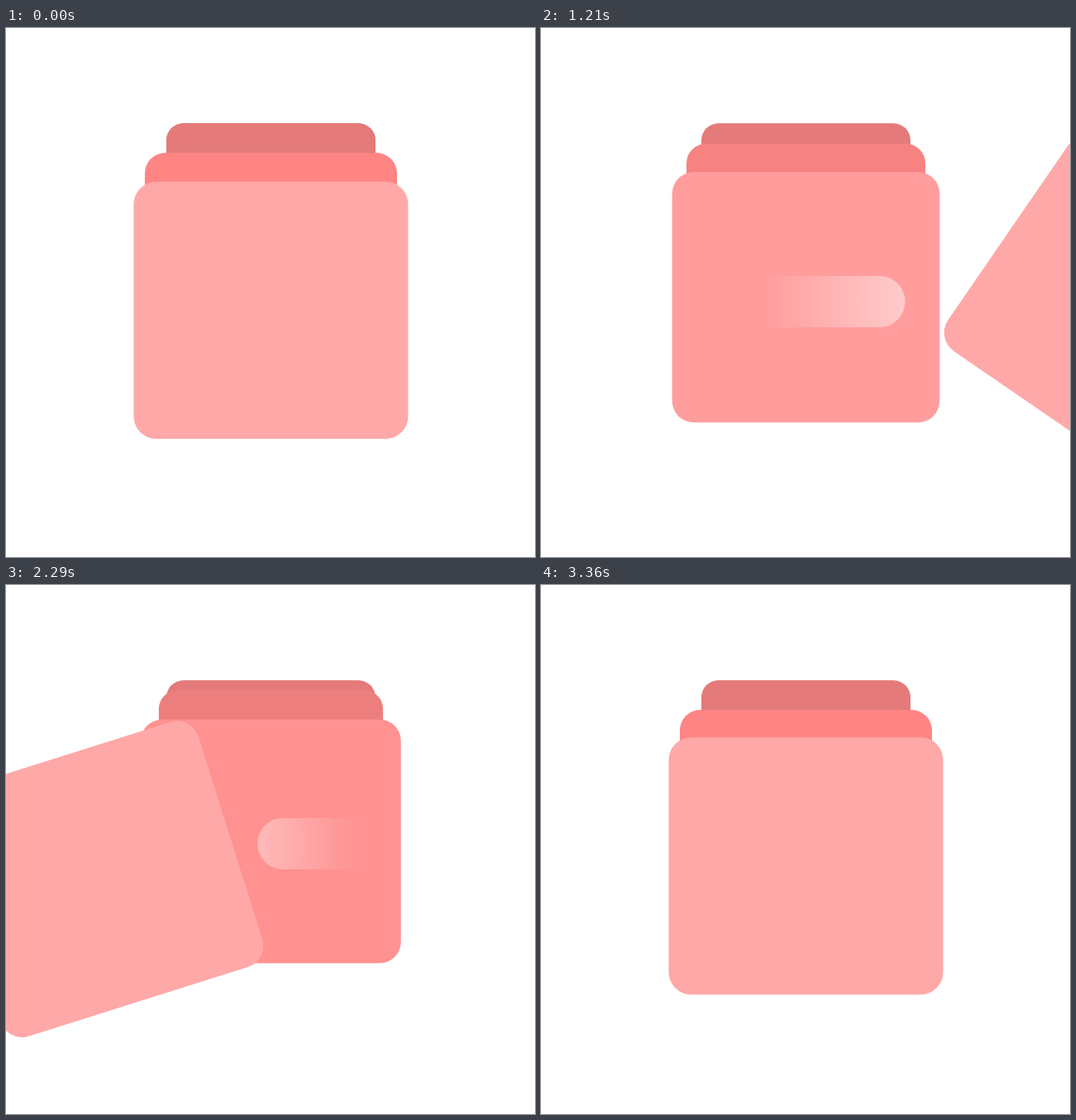
An HTML page with a canvas for the animation above (3430 ms loop, 640 by 640 pixels).

```html
<!DOCTYPE html>
<html lang="en">
<head>
<meta charset="utf-8">
<title>Card stack swipe</title>
<style>
  html, body { margin: 0; width: 100%; height: 100%; overflow: hidden; background: #fff; }
  canvas { display: block; }
</style>
</head>
<body>
<canvas width="640" height="640"></canvas>
<script>
const ctx = document.querySelector('canvas').getContext('2d');
const LOOP = 3430, SWITCH = 1727, CX = 320.5;

// Stack levels from back to front
const levels = [
  { y: 233.8, scale: 0.762, rgb: [228, 122, 122] },
  { y: 294, scale: 0.919, rgb: [255, 133, 133] },
  { y: 340, scale: 1, rgb: [255, 168, 168] }
];

const swipes = [
  { start: 60, time: 1710, ease: 0.12, y: 341.5, dx: 553, dy: 0, turn: 50 },
  { start: SWITCH, time: 1610, ease: 0, y: 340, dx: -592, dy: 45, turn: -50 }
];

// Hints showing the drag direction
const hints = [
  { show: 35, start: 0, center: 202, y: 300, dir: 1 },
  { show: 1675, start: 1710, center: 439, y: 282, dir: -1 }
];

const clamp = v => Math.min(1, Math.max(0, v));
const mix = (a, b, p) => a + (b - a) * p;
const white = a => `rgba(255,255,255,${a})`;

function card(x, y, scale, rgb, angle = 0) {
  ctx.save();
  ctx.translate(x, y);
  ctx.rotate(angle * Math.PI / 180);
  ctx.scale(scale, scale);
  ctx.fillStyle = `rgb(${rgb})`;
  ctx.beginPath();
  ctx.roundRect(-166, -155.5, 332, 311, 27);
  ctx.fill();
  ctx.restore();
}

function grow(from, to, p) {
  card(CX, mix(from.y, to.y, p), mix(from.scale, to.scale, p),
    from.rgb.map((c, i) => mix(c, to.rgb[i], p)));
}

function hint({ show, start, center, y, dir }, t) {
  const age = Math.max(0, t - start);
  const fade = clamp((1600 - age) / 250);
  if (t < show || !fade) return;
  const travel = 0.181 * age - 6.6e-9 * age ** 3;
  const width = 75 + 0.45 * travel;
  const glow = Math.min(0.47, 0.19 + age * 0.0003) * fade;
  ctx.save();
  ctx.translate(center + dir * travel, y + 31);
  ctx.scale(dir, 1);
  const tail = ctx.createLinearGradient(31 - width, 0, 31, 0);
  tail.addColorStop(0, white(0));
  tail.addColorStop(1, white(glow));
  ctx.fillStyle = tail;
  ctx.beginPath();
  ctx.roundRect(31 - width, -31, width, 62, [0, 31, 31, 0]);
  ctx.fill();
  ctx.fillStyle = white(0.035 * clamp(1 - age / 900));
  ctx.beginPath();
  ctx.arc(0, 0, 31, 0, 7);
  ctx.fill();
  ctx.restore();
}

function draw(t) {
  const s = swipes[t < SWITCH ? 0 : 1];
  const u = clamp((t - s.start) / s.time);
  const p = u - s.ease * Math.sin(2 * Math.PI * u) / (2 * Math.PI);
  const [back, middle, front] = levels;
  ctx.fillStyle = '#fff';
  ctx.fillRect(0, 0, 640, 640);
  grow(back, back, 0);
  grow(back, middle, p);
  grow(middle, front, p);
  card(CX + s.dx * p, s.y + s.dy * p, 1, front.rgb, s.turn * p);
  hints.forEach(h => hint(h, t));
}

const begin = performance.now();
function frame() {
  draw((performance.now() - begin) % LOOP);
  requestAnimationFrame(frame);
}
frame();
</script>
</body>
</html>
```
